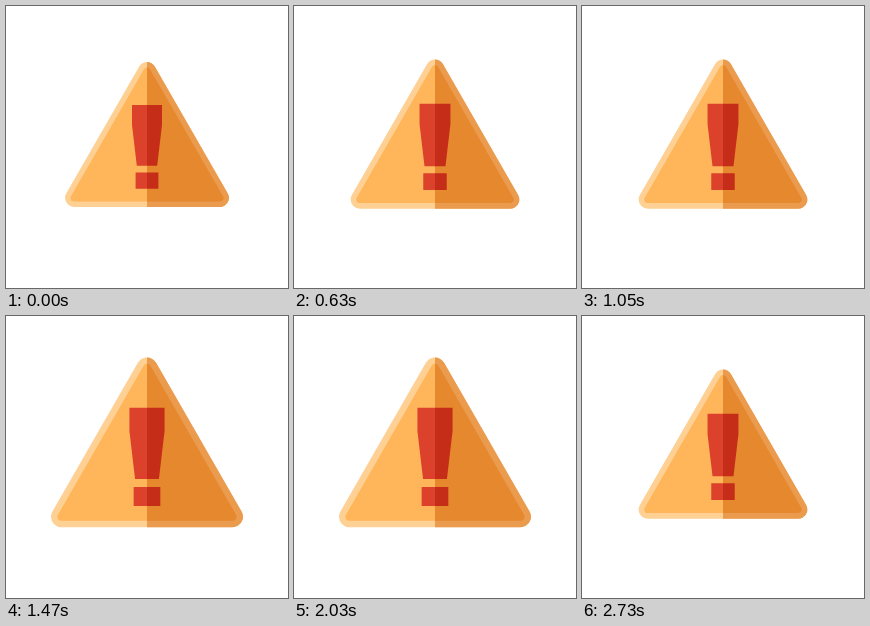
Write an HTML page that moves like this. It is 282 by 282 pixels and loops after 2.8 s.

```html
<!DOCTYPE html>
<html lang="en">
<head>
<meta charset="utf-8">
<title>Pulsing warning sign</title>
<style>
  html, body { margin: 0; height: 100%; overflow: hidden; background: #fff; }
  svg { display: block; width: 100%; height: 100%; }
  .light { --rim: #fed093; --face: #ffb65b; --mark: #dc412c; }
  .shade { --rim: #ea9b4e; --face: #e5882e; --mark: #c62d19; }
  .rim { fill: var(--rim); stroke: var(--rim); stroke-width: 18; }
  .face { fill: var(--face); stroke: var(--face); stroke-width: 7; }
  .mark { fill: var(--mark); }
</style>
</head>
<body>
<svg viewBox="0 0 282 282">
  <defs>
    <clipPath id="right"><path d="M0-141h141v282H0z"/></clipPath>
    <path id="triangle" d="M0-76L73 51H-73z" stroke-linejoin="round"/>
    <g id="sign">
      <use href="#triangle" class="rim"/>
      <use href="#triangle" class="face"/>
      <path class="mark" d="M-15-42H15V-22L10.2 18.8H-10.2L-15-22zM-11.4 25.6H11.4V41.8H-11.4z"/>
    </g>
  </defs>
  <g id="pulse">
    <use href="#sign" class="light"/>
    <g clip-path="url(#right)"><use href="#sign" class="shade"/></g>
  </g>
</svg>
<script>
  const STEP = 70, STEPS_PER_PULSE = 8;
  const pulse = document.getElementById('pulse');

  function render() {
    const step = Math.floor(performance.now() / STEP) % STEPS_PER_PULSE;
    const scale = 1.1 - 0.1 * Math.cos(2 * Math.PI * step / STEPS_PER_PULSE);
    pulse.setAttribute('transform', `translate(141 141) scale(${scale})`);
    requestAnimationFrame(render);
  }
  render();
</script>
</body>
</html>
```
